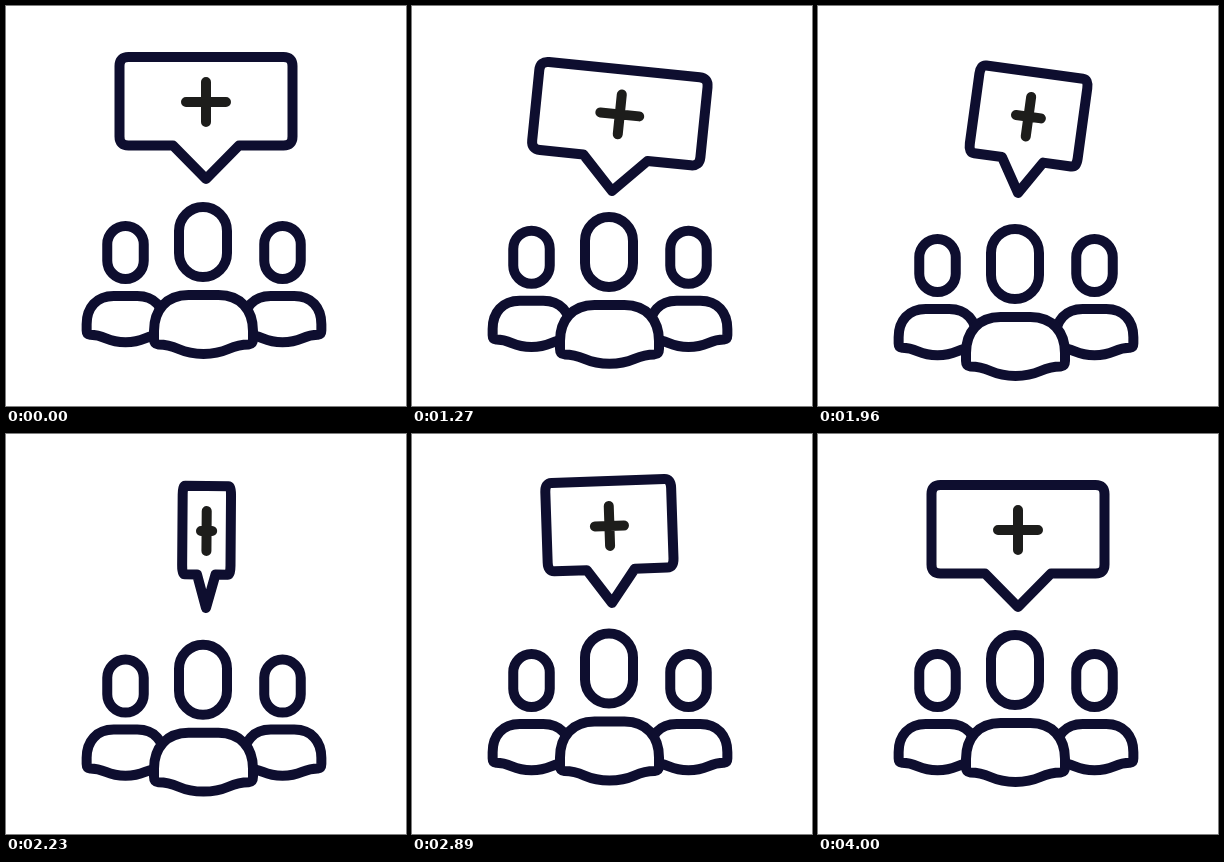
Animation, 400 px wide and 400 px high, one loop 4120 ms. Source, as an HTML page with a canvas:

```html
<!DOCTYPE html>
<html lang="en">
<head>
<meta charset="utf-8">
<title>Group message</title>
<style>
  html, body { margin: 0; width: 100%; height: 100%; overflow: hidden; background: #fff; }
  canvas { display: block; width: 400px; height: 400px; }
</style>
</head>
<body>
<canvas id="stage"></canvas>
<script>
const LOOP = 4120, START = 1030, END = 4000, STEP = 30;
const NAVY = '#0e0e2f', BLACK = '#1d1d1b';

// Each track is a list of [time, value] keys.
const tracks = {
  turn:   [[1000, 0], [1030, 10.5], [1540, 14], [1960, 51], [2500, 96.6], [3370, 174], [3700, 180]],
  tilt:   [[1030, 0], [1560, 13.5], [1960, 7.8], [2540, -5.6], [3370, 4], [3700, 2], [4000, 0]],
  drop:   [[1030, 0], [1560, 28], [1960, 14], [2080, 7], [2560, -7], [3160, -1], [3370, 0]],
  middle: [[1030, 0], [1540, 23], [1720, 24], [1960, 22], [2080, 18], [2500, -2], [2700, -2], [3250, 0]],
  sides:  [[1030, 0], [1540, 12], [1780, 14], [1960, 13], [2080, 10], [2500, 0]]
};

const canvas = document.getElementById('stage');
const ctx = canvas.getContext('2d');
const dpr = window.devicePixelRatio || 1;
canvas.width = canvas.height = 400 * dpr;

// Cubic through the keys, flat at turning points so it never overshoots.
function sample(keys, t) {
  const last = keys.length - 1;
  if (t <= keys[0][0]) return keys[0][1];
  if (t >= keys[last][0]) return keys[last][1];
  let i = 0;
  while (t >= keys[i + 1][0]) i++;
  const rise = k => (keys[k + 1][1] - keys[k][1]) / (keys[k + 1][0] - keys[k][0]);
  const slope = k => {
    if (k === 0 || k === last) return 0;
    const a = rise(k - 1), b = rise(k);
    return a * b <= 0 ? 0 : 2 * a * b / (a + b);
  };
  const [t0, v0] = keys[i], [t1, v1] = keys[i + 1];
  const d = t1 - t0, u = (t - t0) / d, w = 1 - u;
  return v0 * (1 + 2 * u) * w * w + slope(i) * d * u * w * w
       + v1 * u * u * (3 - 2 * u) - slope(i + 1) * d * u * u * w;
}

function base() {
  ctx.setTransform(dpr, 0, 0, dpr, 0, 0);
}

// Builds a path under a transform, then strokes it at a constant weight.
function outline(place, build, color = NAVY, fill = true) {
  base();
  place();
  ctx.beginPath();
  build();
  base();
  if (fill) {
    ctx.fillStyle = '#fff';
    ctx.fill();
  }
  ctx.strokeStyle = color;
  ctx.lineWidth = 10;
  ctx.lineCap = ctx.lineJoin = 'round';
  ctx.stroke();
}

function head(x, y, w, h) {
  outline(() => ctx.translate(x, y), () => ctx.roundRect(-w / 2, 0, w, h, w / 2));
}

function body(x, y, scale) {
  outline(() => { ctx.translate(x, y); ctx.scale(scale, scale); }, () => {
    ctx.moveTo(-15, 0);
    ctx.lineTo(15, 0);
    ctx.bezierCurveTo(37, 0, 49.5, 15, 49.5, 36);
    ctx.lineTo(49.5, 44);
    ctx.quadraticCurveTo(49.5, 49, 45, 49.5);
    ctx.bezierCurveTo(37, 49.5, 32, 51, 25, 54);
    ctx.bezierCurveTo(10, 60.5, -10, 60.5, -25, 54);
    ctx.bezierCurveTo(-32, 51, -37, 49.5, -45, 49.5);
    ctx.quadraticCurveTo(-49.5, 49, -49.5, 44);
    ctx.lineTo(-49.5, 36);
    ctx.bezierCurveTo(-49.5, 15, -37, 0, -15, 0);
    ctx.closePath();
  });
}

// Origin at the tip of the pointer.
function bubble(drop, tilt, width) {
  const place = () => {
    ctx.translate(200, 173 + drop);
    ctx.rotate(tilt * Math.PI / 180);
    ctx.scale(width, 1);
  };
  const x = 86.5, top = -122, low = -33.5, r = 9;
  outline(place, () => {
    ctx.moveTo(0, 0);
    ctx.lineTo(-33, low);
    ctx.lineTo(r - x, low);
    ctx.quadraticCurveTo(-x, low, -x, low - r);
    ctx.lineTo(-x, top + r);
    ctx.quadraticCurveTo(-x, top, r - x, top);
    ctx.lineTo(x - r, top);
    ctx.quadraticCurveTo(x, top, x, top + r);
    ctx.lineTo(x, low - r);
    ctx.quadraticCurveTo(x, low, x - r, low);
    ctx.lineTo(33, low);
    ctx.closePath();
  });
  outline(place, () => {
    ctx.moveTo(-20, -77);
    ctx.lineTo(20, -77);
    ctx.moveTo(0, -97);
    ctx.lineTo(0, -57);
  }, BLACK, false);
}

function draw(t) {
  const at = name => sample(tracks[name], t);
  const mid = at('middle'), side = at('sides');
  base();
  ctx.fillStyle = '#fff';
  ctx.fillRect(0, 0, 400, 400);
  for (const x of [119.5, 276.5]) {
    head(x, 220 + side, 36.5, 53);
    body(x, 290 + side, 0.785);
  }
  head(197, 201 + mid, 48, 70);
  body(197.5, 289 + mid, 1);
  const width = Math.abs(Math.cos(at('turn') * Math.PI / 180));
  bubble(at('drop'), at('tilt'), Math.max(width, 0.01));
}

const origin = performance.now();
function tick() {
  const t = (performance.now() - origin) % LOOP;
  const step = START + Math.floor((t - START) / STEP) * STEP;
  draw(t < START ? 0 : Math.min(step, END));
  requestAnimationFrame(tick);
}
tick();
</script>
</body>
</html>
```
